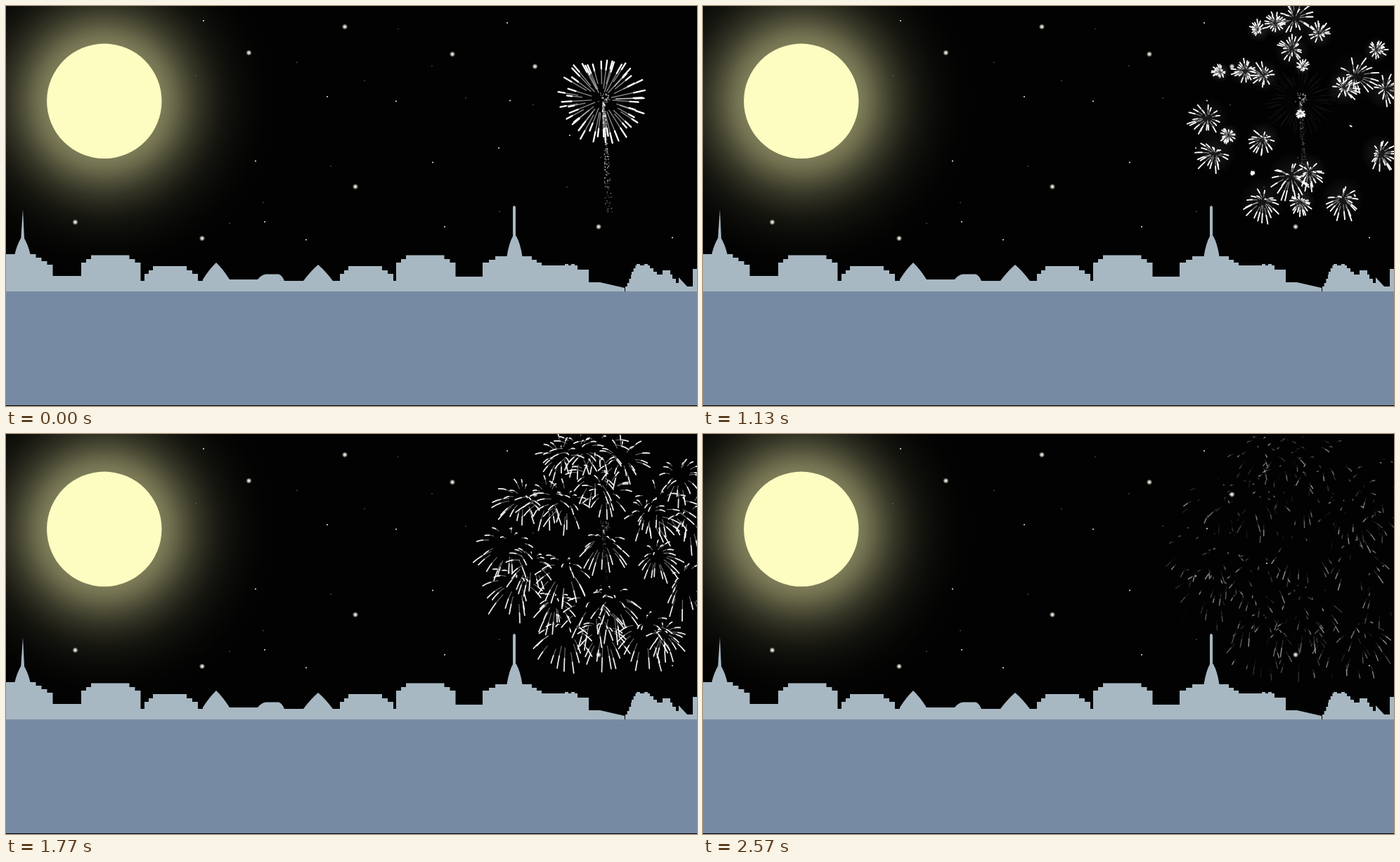
An HTML page with a canvas that plays this animation: 983 px wide and 569 px high, repeating every 2.61 s.

```html
<!DOCTYPE html>
<html lang="en">
<head>
<meta charset="utf-8">
<title>Fireworks over the bay</title>
<style>
  html, body { margin: 0; width: 100%; height: 100%; overflow: hidden; background: #000; }
  canvas { display: block; }
</style>
</head>
<body>
<canvas id="stage" width="983" height="569"></canvas>
<script>
const W = 983, H = 569, SHORE = 406, LOOP = 2610, TAU = Math.PI * 2;
const ctx = document.getElementById('stage').getContext('2d');

const clamp = (v, a = 0, b = 1) => Math.min(b, Math.max(a, v));
const ramp = (t, a, b) => clamp((t - a) / (b - a));
const mix = (a, b, q) => a + (b - a) * q;
const times = (n, make) => Array.from({ length: n }, (_, i) => make(i));

let seed = 41;
function rnd(a = 0, b = 1) {
  seed = (seed * 1664525 + 1013904223) >>> 0;
  return mix(a, b, seed / 4294967296);
}

function dot(g, x, y, r) {
  g.beginPath();
  g.arc(x, y, r, 0, TAU);
  g.fill();
}

function radial(g, x, y, r0, r1, stops) {
  const grad = g.createRadialGradient(x, y, r0, x, y, r1);
  stops.forEach(([at, color]) => grad.addColorStop(at, color));
  return grad;
}

function paintMoon(g) {
  const x = 139.8, y = 135.3, r = 81.7, spread = 170;
  g.fillStyle = radial(g, x, y, r, r + spread, times(17, i => {
    const q = i / 16;
    const a = .55 * Math.exp(-Math.pow(q * spread / 58, 1.4)) * (1 - q ** 4);
    return [q, `rgba(225,225,160,${a})`];
  }));
  g.fillRect(0, 0, 400, SHORE);
  g.fillStyle = '#fdfdc1';
  dot(g, x, y, r);
}

function paintStars(g) {
  const bright = [[345.5, 66.5], [482, 29.5], [635, 68.5], [752.5, 86],
    [497, 257], [279, 330.5], [98.5, 307.5], [843, 314]];
  const medium = [[281, 21], [713, 24], [457, 129], [555, 135.5], [717, 134.5], [355, 220.5],
    [607, 222.5], [701, 202], [624, 314], [368, 307], [427, 332.5], [948, 329.5], [802, 184]];
  for (const [x, y] of bright) {
    g.fillStyle = radial(g, x, y, 0, 4.2,
      [[0, '#fffff0'], [.4, 'rgba(255,255,240,.75)'], [1, 'rgba(255,255,240,0)']]);
    dot(g, x, y, 4.2);
  }
  g.fillStyle = '#dcdccb';
  for (const [x, y] of medium) dot(g, x, y, 1.1);
  g.fillStyle = '#85857c';
  for (let i = 0; i < 13; i++) dot(g, 270 + i * 48, rnd(28, 310), .7);
}

function paintCity(g) {
  const box = (l, r, top) => g.fillRect(l, top, r - l, SHORE - top);
  const shape = d => g.fill(new Path2D(d));
  // rising terraces that narrow on both sides
  const terrace = (l, r, tops, dl, dr) => tops.forEach((top, i) => box(l + i * dl, r - i * dr, top));
  const hall = x => terrace(x, x + 84.5, [365, 360, 354.5], 7, 8);
  const house = x => terrace(x, x + 76, [381, 376, 370], 6, 8);
  const dome = (x, w, base, top) => shape(`M${x - w} 406V${base}Q${x - w / 2} ${top + 9} ${x} ${top}` +
    `Q${x + w / 2} ${top + 9} ${x + w} ${base}V406Z`);
  const tower = (x, base, neck) => shape(
    `M${x - 11} ${base}Q${x - 8} ${neck + 10} ${x - 2.2} ${neck}H${x + 2.2}Q${x + 8} ${neck + 10} ${x + 11} ${base}Z`);

  g.fillStyle = '#a8b8c2';
  shape('M0 406V384H107V391H280V389H390V391H639V385H678V393H845L880 401V406Z');
  terrace(0, 66.5, [368, 363, 358, 353], 0, 8);
  tower(23.5, 353, 330);
  shape('M21.300 330L24 289L26 330Z');
  hall(107);
  hall(555);
  house(197);
  house(475);
  dome(299, 19, 389, 365);
  dome(444, 21, 391, 368);
  shape('M357 390Q363 382 370 381.500H388Q393 383 396 391Z');

  terrace(678, 829, [375, 369], 0, 16);
  terrace(678, 762, [365, 361, 356], 9, 7);
  tower(723.5, 356, 327);
  shape('M721 330V286Q723 282 725 286V330Z');
  terrace(881, 963, [399, 394, 388, 382], 2.7, 5);
  terrace(890, 926, [378, 373, 369], 2.7, 5);
  for (const x of [795, 804, 897, 908]) g.fillRect(x, 367, 5, 4);
  g.fillRect(934, 376, 11, 8);
  shape('M957 386L969 399H977V374H983V406H957Z');
}

function paintScene() {
  const layer = document.createElement('canvas');
  layer.width = W;
  layer.height = H;
  const g = layer.getContext('2d');
  g.fillStyle = '#020202';
  g.fillRect(0, 0, W, H);
  paintMoon(g);
  paintStars(g);
  paintCity(g);
  g.fillStyle = '#768ba3';
  g.fillRect(0, SHORE, W, 162);
  g.fillStyle = '#000';
  g.fillRect(0, 568, W, 1);
  return layer;
}

const scene = paintScene();
const hub = { x: 848, y: 133 };
const EASE = 450;

// burst centres in the order they open
const centres = [
  [927, 100], [836, 242], [797, 277], [842, 18], [910, 274], [728, 210], [718, 160],
  [970, 119], [963, 210], [862, 236], [838, 62], [911, 117], [797, 189], [798, 99],
  [772, 93], [850, 278], [876, 40], [815, 25], [958, 63], [790, 34], [748, 184],
  [736, 94], [853, 86], [850, 152], [782, 237], [924, 172], [935, 283]
];

const shells = centres.map(([x, y], i) => {
  const u = i / (centres.length - 1);
  const dx = x - hub.x, dy = y - hub.y, dist = Math.hypot(dx, dy);
  const turn = rnd(0, TAU), n = 19;
  return {
    x, y, dist, ux: dx / dist, uy: dy / dist,
    size: 50 - 8 * u,
    start: 770 + 290 * u + 200 * u ** 14,
    rays: times(n, j => ({
      a: turn + (j + rnd(-.5, .5)) / n * TAU,
      k: 1.04 - .6 * rnd() ** 2,
      cut: rnd(-.08, .1),
      fade: rnd(.45, 1.25)
    }))
  };
});

const RAYS = 50;
const rays = times(RAYS, i => ({
  a: (i + rnd(-.7, .7)) / RAYS * TAU,
  k: rnd(.77, 1.03),
  late: rnd(.66, 1),
  tail: rnd(.2, .6),
  end: rnd(760, 1010)
}));

const sparks = times(190, () => {
  const p = rnd() ** 1.3;
  return { p, x: 850 + p * 8 + rnd(-1, 1) * (2 + p * 3), y: 138 + p * 156, r: rnd(.45, 1.05), life: rnd(.5, 1) };
});

const embers = times(36, () => {
  const a = rnd(0, TAU), r = 9 * Math.sqrt(rnd());
  return [hub.x + 2 + Math.cos(a) * r, hub.y - 1 + Math.sin(a) * r];
});

// a line that is thinner and dimmer in its older half
function streak(pts, width, alpha) {
  [[0, .65, .5], [pts.length >> 1, 1, 1]].forEach(([from, w, a]) => {
    ctx.globalAlpha = alpha * a;
    ctx.lineWidth = width * w;
    ctx.beginPath();
    pts.slice(from).forEach(([x, y]) => ctx.lineTo(x, y));
    ctx.stroke();
  });
}

function drawTrail(t) {
  const dim = 1 - .65 * ramp(t, 0, 1200) - .33 * ramp(t, 1200, 2500);
  for (const s of sparks) {
    const gone = 700 + 1500 * (1 - s.p);
    ctx.globalAlpha = dim * (1 - s.p * .65) * s.life * (1 - ramp(t, gone, gone + 450));
    dot(ctx, s.x, s.y, s.r);
  }
  const hot = .9 * (1 - ramp(t, 0, 900));
  if (hot > 0) streak([[849, 142], [850, 155], [852, 174], [853, 194]], 2.4, hot);
  ctx.globalAlpha = .4 * (1 - ramp(t, 900, 2500));
  for (const [x, y] of embers) dot(ctx, x, y, 1);
}

function drawMain(t) {
  const reach = 62 + 46 * (1 - Math.exp(-t / 500));
  const drop = 6 * (t / 730) ** 2;
  for (const p of rays) {
    const k = mix(p.k, p.late, ramp(t, 0, 730));
    const c = Math.cos(p.a), s = Math.sin(p.a);
    const at = f => [hub.x + c * reach * k * f, hub.y + s * reach * k * f + drop * f * f];
    const tail = mix(p.tail, .85, ramp(t, 0, 700));
    const alpha = 1 - ramp(t, p.end - 200, p.end);
    if (alpha > 0) streak([0, .33, .67, 1].map(q => at(mix(tail, 1, q))), 2.3, alpha);
    const smoke = .05 * ramp(t, 100, 600) * (1 - ramp(t, 1300, 1900));
    if (smoke > 0) streak([at(.12), at(.3), at(.5)], 1.2, smoke);
  }
}

// the unopened shell travels outward from the hub
function drawFlight(b, t) {
  const bright = .85 * ramp(t, 350, 650);
  if (!bright) return;
  const r = mix(Math.min(58, b.dist * .45), b.dist, (t / b.start) ** 1.25);
  streak([r - 3, r - 1.5, r].map(q => [hub.x + b.ux * q, hub.y + b.uy * q]), 2.4, bright);
}

function drawHaze(b, r, alpha) {
  ctx.globalAlpha = alpha;
  ctx.fillStyle = radial(ctx, b.x, b.y, 0, r, [[0, '#fff'], [1, 'rgba(255,255,255,0)']]);
  dot(ctx, b.x, b.y, r);
  ctx.fillStyle = '#fff';
}

function drawBurst(b, t) {
  const age = t - b.start;
  const grow = 1 - Math.exp(-age / EASE);
  drawHaze(b, b.size * grow * 1.15 + 3, .2 * (1 - ramp(age, 50, 550)));
  const tail = .3 + .52 * ramp(age, 300, 1500);
  const width = 1.9 - .3 * ramp(t, 1400, 2170);
  const glow = .95 - .2 * ramp(t, 1500, 2170);
  const late = ramp(t, 2000, 2650);
  for (const p of b.rays) {
    const alpha = glow * (1 - late * p.fade);
    if (alpha <= 0) continue;
    const pts = [0, .25, .5, .75, 1].map(q => {
      const e = grow * mix(tail + p.cut, 1, q);
      const r = b.size * p.k * e;
      return [b.x + Math.cos(p.a) * r + b.ux * 12 * e,
              b.y + Math.sin(p.a) * r + b.uy * 12 * e + 18 * e ** 3];
    });
    streak(pts, width, alpha);
  }
}

function render(t) {
  ctx.globalAlpha = 1;
  ctx.drawImage(scene, 0, 0);
  ctx.fillStyle = ctx.strokeStyle = '#fff';
  ctx.lineCap = ctx.lineJoin = 'round';
  drawTrail(t);
  drawMain(t);
  for (const b of shells) (t < b.start ? drawFlight : drawBurst)(b, t);
}

function tick() {
  render(performance.now() % LOOP);
  requestAnimationFrame(tick);
}
tick();
</script>
</body>
</html>
```
